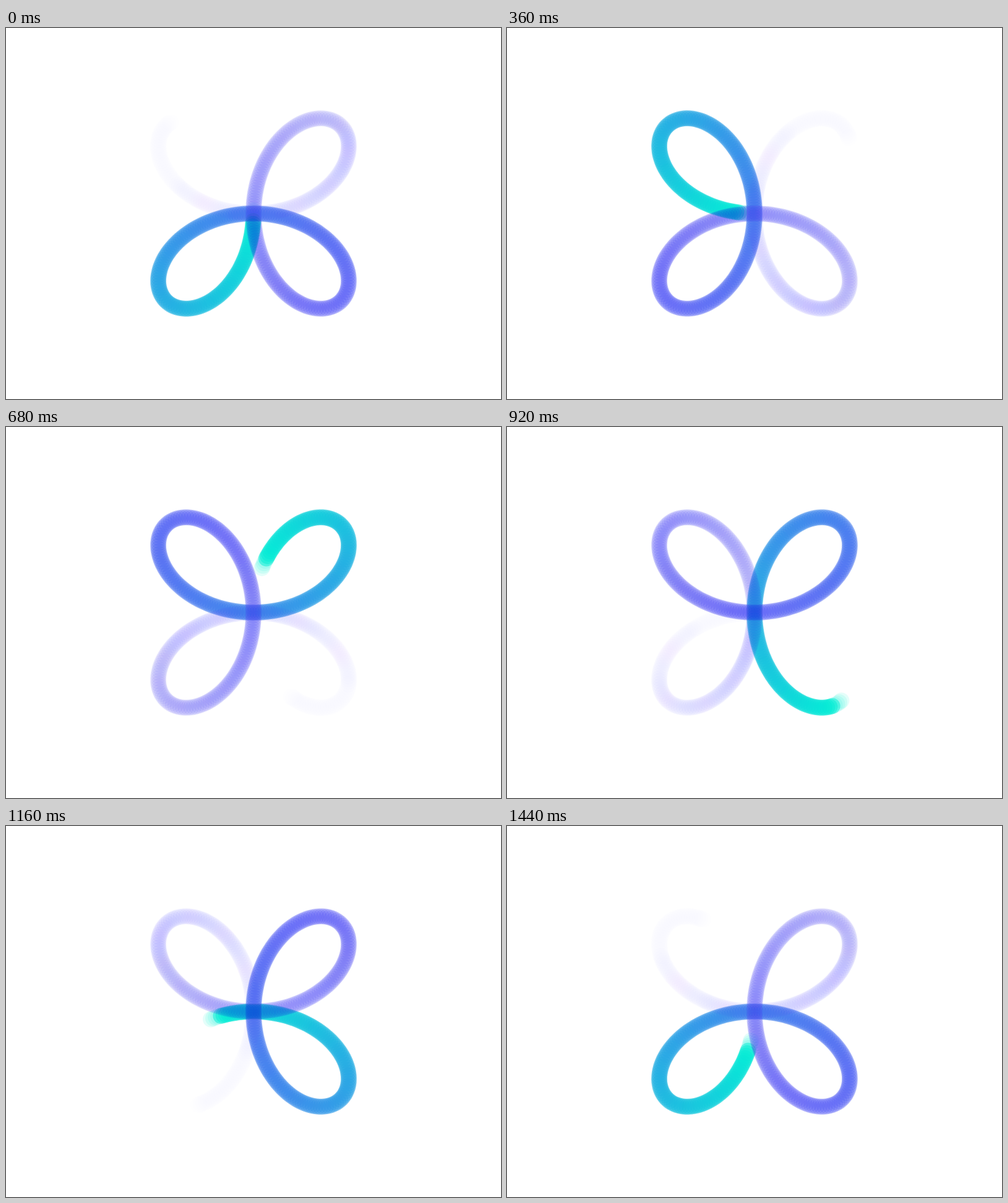
These frames come from a looping animation (800 px wide and 600 px high, 1.48 s). An HTML page with a canvas:

```html
<!DOCTYPE html>
<html lang="en">
<head>
<meta charset="utf-8">
<title>Rose loader</title>
<style>
  html, body { margin: 0; width: 100%; height: 100%; overflow: hidden; background: #fff; }
  canvas { display: block; width: 800px; height: 600px; }
</style>
</head>
<body>
<canvas id="stage" width="800" height="600"></canvas>
<script>
const ctx = document.getElementById('stage').getContext('2d');
const LOOP = 1480, TICK = 40;
const SIZE = 200, RADIUS = 13, DOTS = 450, TRAIL = 0.93, LEAD = 5, TIP = 14;
const CYAN = [0, 243, 212], INDIGO = [76, 76, 246], VIOLET = [112, 90, 250];
const TAU = Math.PI * 2;

// Four-petal rose, starting at the centre and heading up
function rose(a) {
  const r = SIZE * Math.sin(2 * a);
  return [400 + r * Math.cos(a), 300 - r * Math.sin(a)];
}

// Running arc length, so the head keeps an even speed
const N = 2880, START = Math.PI * 1.5;
const lengths = [0];
for (let i = 1; i <= N; i++) {
  const c = Math.cos(2 * (i - 0.5) / N * TAU);
  lengths.push(lengths[i - 1] + SIZE * Math.sqrt(1 + 3 * c * c) * TAU / N);
}
const LAP = lengths[N];

function pointAt(s) {
  s = ((s % LAP) + LAP) % LAP;
  let lo = 0, hi = N;
  while (hi - lo > 1) {
    const mid = (lo + hi) >> 1;
    if (lengths[mid] <= s) lo = mid; else hi = mid;
  }
  const k = (s - lengths[lo]) / (lengths[hi] - lengths[lo]);
  return rose(START + (lo + k) / N * TAU);
}

const mix = (a, b, k) => a.map((v, i) => v + (b[i] - v) * k);

// u is the age of a dot as a share of one lap
function colourAt(u) {
  const fresh = Math.pow(Math.max(0, 1 - u / 0.4), 1.4);
  const old = Math.max(0, (u - 0.4) / 0.6);
  return mix(mix(INDIGO, CYAN, fresh), VIOLET, old).map(Math.round).join(',');
}

// Opacity of one dot; neighbours overlap to build up the stroke
const gap = LAP / DOTS;
function alphaAt(u) {
  const tip = u * LAP < TIP ? 0.15 : 1;
  const depth = 5.2 * (TRAIL - u) ** 2 * tip;
  return 1 - Math.exp(-depth * gap / (2 * RADIUS));
}

const trail = [];
for (let i = 0; i / DOTS < TRAIL; i++) {
  const u = i / DOTS;
  trail.push({ back: i * gap, fill: `rgba(${colourAt(u)},${alphaAt(u).toFixed(4)})` });
}

function draw(ms) {
  const head = LAP * ms / LOOP + LEAD;
  ctx.globalCompositeOperation = 'source-over';
  ctx.fillStyle = '#fff';
  ctx.fillRect(0, 0, 800, 600);
  // Crossing strokes keep the darker of each channel
  ctx.globalCompositeOperation = 'darken';
  for (const dot of trail) {
    const [x, y] = pointAt(head - dot.back);
    ctx.fillStyle = dot.fill;
    ctx.beginPath();
    ctx.arc(x, y, RADIUS, 0, TAU);
    ctx.fill();
  }
}

let begin = null;
function frame(now) {
  if (begin === null) begin = now;
  const t = (now - begin) % LOOP;
  draw(Math.floor(t / TICK) * TICK);
  requestAnimationFrame(frame);
}
draw(0);
requestAnimationFrame(frame);
</script>
</body>
</html>
```
